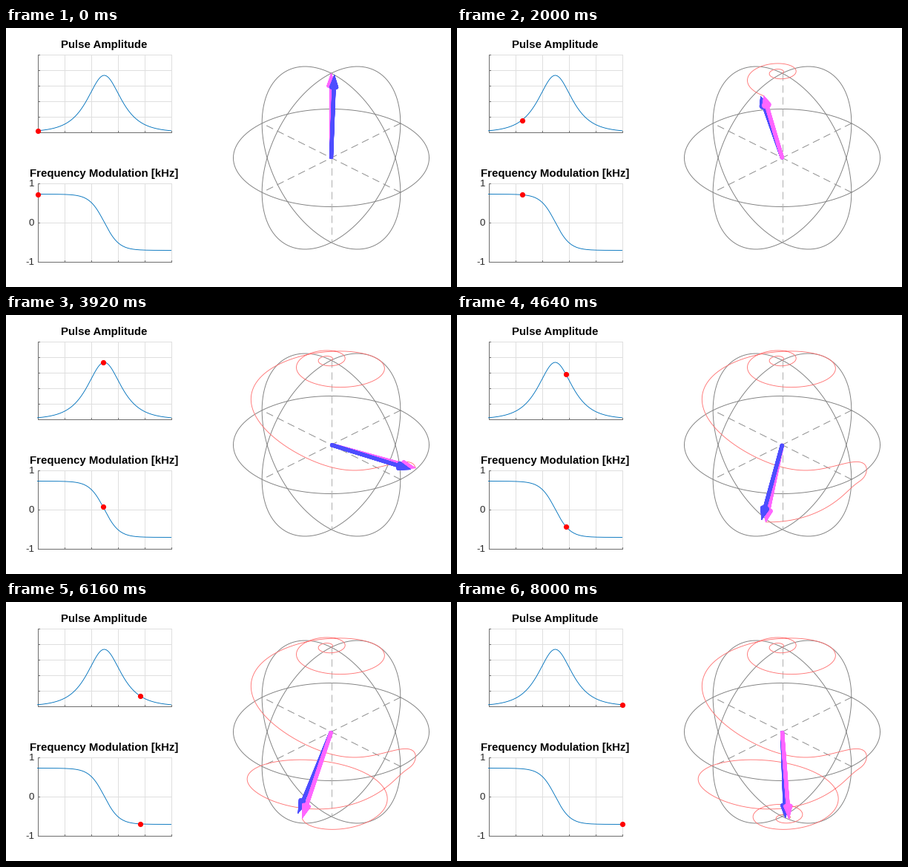
Write a matplotlib script that moves like this. It is 600 px wide and 350 px high and loops after 8080 ms.

```python
import numpy as np
import matplotlib
import matplotlib.pyplot as plt
from matplotlib.animation import FuncAnimation
from matplotlib.collections import PolyCollection

W, H, DPI = 600, 350, 100
PX = 72 / DPI                      # one pixel in points
FRAMES, INTERVAL = 101, 80
SUB = 20                           # integration steps per frame

# hyperbolic secant pulse, times in ms and frequencies in kHz
T, MU, BETA, B1_MAX = 10.0, 5.0, 0.9, 1.46
CENTRE, RADIUS = (438, 175), 132
ELEV = np.radians(30)

plt.rcParams["font.family"] = "Liberation Sans"


def amplitude(t):
    return B1_MAX / np.cosh(BETA * t)


def detuning(t):
    return -MU * BETA / (2 * np.pi) * np.tanh(BETA * t)


def phase(t):
    swept = np.log(np.cosh(BETA * T / 2)) - np.log(np.cosh(BETA * t))
    return MU * swept - np.pi / 4


def rotate(v, axis, angle):
    c, s = np.cos(angle), np.sin(angle)
    return v * c + np.cross(axis, v) * s + axis * (axis @ v) * (1 - c)


def magnetisation():
    """Bloch path in the carrier frame, starting along +z."""
    n = (FRAMES - 1) * SUB
    dt = T / n
    path = [np.array([0.0, 0.0, 1.0])]
    for i in range(n):
        t = -T / 2 + (i + 0.5) * dt
        axis = np.array([np.cos(phase(t)), np.sin(phase(t)), 0])
        path.append(rotate(path[-1], axis, -2 * np.pi * amplitude(t) * dt))
    return np.array(path)


def field(t):
    b, f = amplitude(t), detuning(t)
    v = np.array([b * np.cos(phase(t)), b * np.sin(phase(t)), f])
    return v / np.linalg.norm(v)


def project(p):
    """Axes of p: right, away from the viewer, up."""
    p = np.asarray(p)
    up = p[..., 1] * np.sin(ELEV) + p[..., 2] * np.cos(ELEV)
    return np.stack([CENTRE[0] + RADIUS * p[..., 0], CENTRE[1] - RADIUS * up], -1)


def nearness(v):
    return v[2] * np.sin(ELEV) - v[1] * np.cos(ELEV)


def arrow_faces(d, stem=0.018, head=0.045, length=0.15, n=20):
    side = np.cross(d, [0.6, 0.8, 0] if abs(d[2]) > 0.7 else [0, 0, 1])
    side /= np.linalg.norm(side)
    other = np.cross(d, side)
    a = np.linspace(0, 2 * np.pi, n + 1)[:, None]
    ring = np.cos(a) * side + np.sin(a) * other
    low = project(stem * ring)
    top = project(stem * ring + (1 - length) * d)
    base = project(head * ring + (1 - length) * d)
    tip = project(d)
    faces = [base, low]
    for i in range(n):
        faces.append(np.array([base[i], base[i + 1], tip]))
        faces.append(np.array([low[i], low[i + 1], top[i + 1], top[i]]))
    return faces


fig = plt.figure(figsize=(W / DPI, H / DPI), dpi=DPI, facecolor="white")
ax = fig.add_axes([0, 0, 1, 1])
ax.set_xlim(-0.5, W - 0.5)
ax.set_ylim(H - 0.5, -0.5)
ax.axis("off")


def line(x, y, color, width=1.0, **kw):
    return ax.plot(x, y, color=color, lw=width * PX, **kw)[0]


LEFT, RIGHT = 42, 222
GRID, INK, CURVE = "#dfdfdf", "#262626", "#0072bd"


def panel(top, bottom, rows, title, title_y):
    cols = np.linspace(LEFT, RIGHT, 6)
    for x in cols[1:]:
        line([x, x], [top, bottom], GRID)
    for y in rows:
        line([LEFT, RIGHT], [y, y], GRID)
    axis = "#6e6e6e"
    line([LEFT, LEFT], [top, bottom], axis)
    line([LEFT, RIGHT], [bottom, bottom], axis)
    for x in cols:
        line([x, x], [bottom - 2, bottom], axis)
    for y in rows:
        line([LEFT, LEFT + 2], [y, y], axis)
    ax.text((LEFT + RIGHT) / 2 - 0.3, title_y, title, size=15 * PX,
            weight="bold", ha="center", va="baseline", color="black")


def amp_y(t):
    return 140 - 76.5 * amplitude(t) / B1_MAX


def freq_y(t):
    return 262 - 53 * detuning(t)


def time_x(t):
    return LEFT + (RIGHT - LEFT) * (t / T + 0.5)


panel(35, 140, np.linspace(35, 119, 5), "Pulse Amplitude", 26)
panel(209, 315, [209, 262], "Frequency Modulation [kHz]", 201)
for y, label in ((209, "1"), (262, "0"), (315, "-1")):
    ax.text(37.5, y + 4.6, label, size=13.3 * PX, ha="right",
            va="baseline", color=INK)

ts = np.linspace(-T / 2, T / 2, 301)
line(time_x(ts), amp_y(ts), CURVE, 0.9)
line(time_x(ts), freq_y(ts), CURVE, 0.9)

# sphere outline: equator, two meridians and the three axes
ang = np.linspace(0, 2 * np.pi, 241)
cos, sin, zero = np.cos(ang), np.sin(ang), 0 * ang
r = np.sqrt(0.5)
for ring in ((cos, sin, zero), (r * cos, r * cos, sin), (r * cos, -r * cos, sin)):
    line(*project(np.stack(ring, -1)).T, "#808080", 0.95)
for end, shade in (((r, r, 0), "#909090"), ((r, -r, 0), "#909090"),
                   ((0, 0, 1), "#b0b0b0")):
    ends = project(np.array([end, np.negative(end)]))
    line(*ends.T, shade, 1, dashes=(10, 6), dash_capstyle="butt")

path = magnetisation()
path_xy = project(path)
trace = line([], [], "#ff7474", 0.9)


def make_arrow(color):
    body = PolyCollection([], facecolors=color, edgecolors=color, linewidths=0.3)
    ax.add_collection(body, autolim=False)
    return body


spin = make_arrow("#ff66ff")
beff = make_arrow("#4d4dff")
dots = line([], [], "red", ls="none", marker="o", ms=7.2 * PX, mew=0, zorder=6)


def update(k):
    t = -T / 2 + T * k / (FRAMES - 1)
    m, b = path[k * SUB], field(t)
    trace.set_data(*path_xy[:k * SUB + 1].T)
    dots.set_data([time_x(t)] * 2, [amp_y(t), freq_y(t)])
    spin.set_verts(arrow_faces(m))
    beff.set_verts(arrow_faces(b))
    front = nearness(b) >= nearness(m)
    spin.set_zorder(4)
    beff.set_zorder(5 if front else 3)
    return trace, dots, spin, beff


anim = FuncAnimation(fig, update, frames=FRAMES, interval=INTERVAL,
                     repeat=True, repeat_delay=0, blit=False)
plt.show()
```
